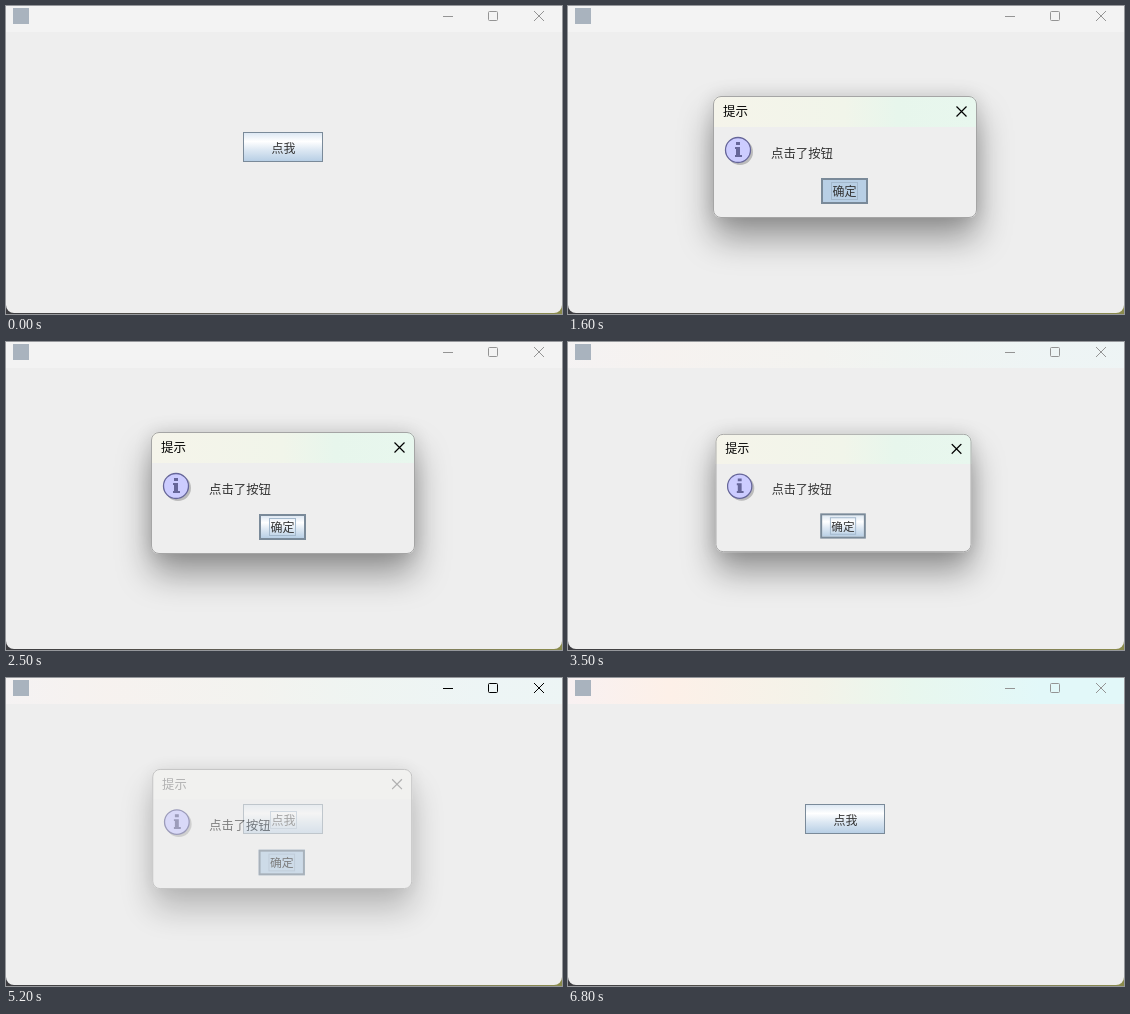
An HTML page for the animation above (7000 ms loop, 556 by 308 pixels).

```html
<!DOCTYPE html>
<html lang="zh-CN">
<head>
<meta charset="utf-8">
<style>
* { box-sizing: border-box; }
html, body { margin: 0; width: 100%; height: 100%; overflow: hidden; }
body {
  position: relative;
  background: linear-gradient(90deg, #3c3c40, #55524a 30%, #77756a 60%, #8a8a4c);
  font: 12px/16px "Noto Sans CJK SC", "Noto Sans CJK JP", sans-serif;
  color: #333;
}
div, svg, span { position: absolute; }
span { white-space: nowrap; }
#window {
  left: 0; top: 0; width: 556px; height: 307px;
  background: #eee; border-radius: 0 0 8px 8px; overflow: hidden;
}
#bar, #tint { left: 0; top: 0; width: 556px; height: 26px; background: #f3f3f3; }
#tint { background: linear-gradient(90deg, #f8f1f2, #fdf0e8 18%, #f3f3e9 45%, #e8f7ee 62%, #e2f8f9 85%); }
#appIcon { left: 7px; top: 2px; width: 16px; height: 16px; background: #a9b3be; }
#controls { left: 430px; top: 0; fill: none; }
.button {
  border: 1px solid #7a8a99;
  background: linear-gradient(#dde8f3, #fff 30%, #dde8f3 60%, #b8cfe5);
  text-align: center;
}
.button.pressed { background: #b8cfe5; }
.button.hover { border-color: #b8cfe5; box-shadow: inset 0 0 0 1px #6f8cb0, inset 0 0 0 2px #b8cfe5; }
.button span { border: 1px solid transparent; }
.button.focus span { border-color: #a3b8cc; }
#main { left: 237px; top: 126px; width: 80px; height: 30px; }
#main span { left: 26px; top: 6px; width: 27px; height: 18px; line-height: 16px; }
#dialog {
  left: 145px; top: 90px; width: 264px; height: 122px;
  background: #eee; border-radius: 8px;
  box-shadow: 0 20px 34px rgba(0,0,0,.38), 0 0 18px rgba(0,0,0,.12);
}
#head {
  left: 0; top: 0; width: 264px; height: 31px; border-radius: 8px 8px 0 0;
  background: linear-gradient(90deg, #f5f4ea, #f1f5ea 50%, #e7f6ec 70%, #e8f7ee);
}
#dialog.closing #head { background: #f3f3f0; color: #888; }
#frame { inset: 0; border: 1px solid #a5a5a5; border-radius: 8px; }
#head { color: #000; }
#head span { left: 10px; top: 7px; font-size: 12.5px; }
#cross { left: 243px; top: 10px; stroke: currentColor; }
#info { left: 10px; top: 39px; }
#message { left: 58px; top: 49px; font-size: 12.4px; }
#ok { left: 108px; top: 82px; width: 47px; height: 26px; border-width: 2px; }
#ok span { left: 8px; top: 2px; width: 27px; height: 18px; line-height: 16px; }
</style>
</head>
<body>
<div id="window">
  <div id="bar"></div><div id="tint"></div>
  <div id="appIcon"></div>
  <svg id="controls" width="120" height="20">
    <path d="M7 10.5h10"/><rect x="52.5" y="5.5" width="9" height="9" rx="1"/>
    <path d="M98 5l10 10M108 5l-10 10"/>
  </svg>
  <div id="main" class="button"><span>点我</span></div>
  <div id="dialog">
    <div id="head">
      <span>提示</span>
      <svg id="cross" width="12" height="12"><path d="M.5.5l10 10M10.5.5l-10 10" stroke-width="1.2"/></svg>
    </div>
    <svg id="info" width="34" height="34">
      <circle cx="17" cy="17" r="13" fill="#bbb"/>
      <circle cx="15" cy="15" r="12.5" fill="#ccccff" stroke="#666699" stroke-width="1.3"/>
      <path d="M13 7h4v3h-4zM12 12h5v8h2v2h-7v-2h1v-6h-1z" fill="#666699"/>
    </svg>
    <span id="message">点击了按钮</span>
    <div id="ok" class="button focus"><span>确定</span></div>
    <div id="frame"></div>
  </div>
</div>
<script>
const LOOP = 7000, STEP = 100, BLUR_AT = 6800;
// Each round: hover, press button, dialog settled, press OK, dialog gone.
const rounds = [
  [400, 600, 1000, 1600, 1900],
  [1900, 2100, 2500, 2900, 3200],
  [3200, 3300, 3700, 3900, 4200],
  [4200, 4300, 4600, 5100, 5400],
  [5500, 5700, 5900, 6100, 6400]
].map(([hover, press, settled, ok, gone]) => ({ hover, press, settled, ok, gone }));

// Indexed by steps left until settled, and by steps since OK was pressed.
const opening = { scale: [1, .99, .97, .92], alpha: [1, 1, 1, .4], tint: [0, .1, .3, .7] };
const closing = { scale: [1, .985, .955], alpha: [1, .6, .2], tint: [0, .35, .75] };

const $ = id => document.getElementById(id);
const between = (t, from, to) => t >= from && t < to;

function draw(t) {
  const first = rounds[0];
  const round = rounds.filter(r => t >= r.hover).pop() || first;
  const shown = t > round.press && t < round.gone;
  const isClosing = shown && t > round.ok;
  let scale = 1, alpha = 0, tint = t >= first.gone ? 1 : 0;
  if (shown) {
    const phase = t >= round.ok ? closing : opening;
    const i = Math.max(0, (t >= round.ok ? t - round.ok : round.settled - t) / STEP);
    scale = phase.scale[i];
    alpha = phase.alpha[i];
    tint = round === first && phase === opening ? 0 : phase.tint[i];
  }
  const active = between(t, first.press, BLUR_AT) && (!shown || isClosing);
  $("tint").style.opacity = tint;
  $("controls").style.stroke = active ? "#000" : "#949494";
  const main = $("main").classList;
  main.toggle("hover", between(t, round.hover, round.press));
  main.toggle("pressed", t === round.press);
  main.toggle("focus", between(t, first.press, BLUR_AT));
  $("dialog").style.opacity = alpha;
  $("dialog").style.transform = scale === 1 ? "none" : `translateX(${(scale - 1) * 50}px) scale(${scale})`;
  $("dialog").classList.toggle("closing", isClosing);
  $("ok").classList.toggle("pressed", shown && t >= round.ok);
}

const start = performance.now();
function tick() {
  const t = (performance.now() - start) % LOOP;
  draw(Math.floor(t / STEP) * STEP);
  requestAnimationFrame(tick);
}
tick();
</script>
</body>
</html>
```
